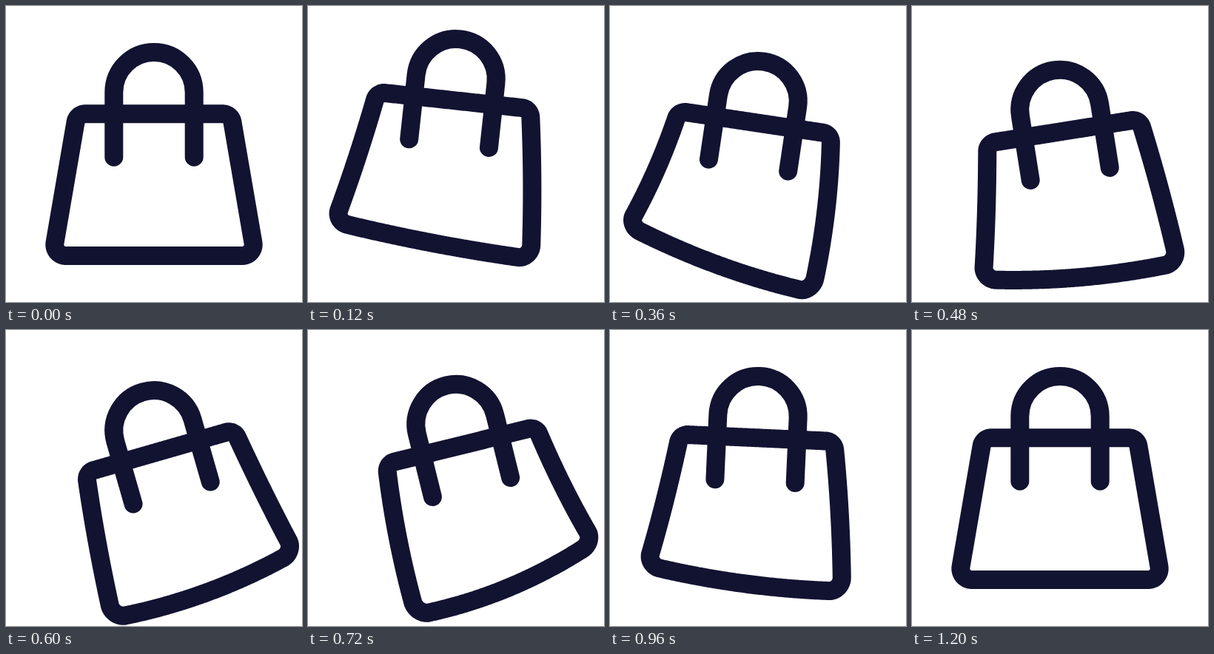
An HTML page that plays this animation: 400 px wide and 400 px high, repeating every 3.23 s.

```html
<!DOCTYPE html>
<html lang="en">
<head>
<meta charset="utf-8">
<title>Swinging bag</title>
<style>
  html, body { margin: 0; width: 100%; height: 100%; overflow: hidden; background: #fff; }
  svg { display: block; width: 100vw; height: 100vh; }
  path { fill: none; stroke: #121331; stroke-width: 25; stroke-linecap: round; stroke-linejoin: round; }
</style>
</head>
<body>
<svg viewBox="0 0 400 400">
  <path id="body" d="M107 145.8H293A13 13 0 0 1 305.9 156.6L334 320A15 15 0 0 1 319.2 337.5H80.8A15 15 0 0 1 66 320L94.1 156.6A13 13 0 0 1 107 145.8Z"/>
  <path id="handle" d="M145.8 204.2V116.7A54.2 54.2 0 0 1 254.2 116.7V204.2"/>
</svg>
<script>
const LOOP = 3230, STEP = 30, END = 1200;
const PX = 200, PY = 116.7;        // pivot: centre of the handle arc
const TOP = 29.1, HEIGHT = 191.7;  // body, measured down from the pivot
const RAD = Math.PI / 180;

// [time, value] keys
const SWING = [[0, 0], [240, 13.8], [360, 8.5], [480, -9], [620, -16.5], [720, -13.9], [960, 2.6], [1080, 2], [END, 0]];
const BEND = [[0, 0], [240, 11.2], [360, 11.6], [480, 4], [720, -8.6], [960, 5], [1080, 5], [END, 0]];
const SAG = [[0, 0], [240, 7], [480, 7], [720, 11], [960, 6], [1080, 4.5], [END, 0]];
const LIFT = [[0, 0], [180, -24], [450, 24], [960, 0], [END, 0]];

const body = document.getElementById('body');
const handle = document.getElementById('handle');
const length = body.getTotalLength();
const outline = Array.from({ length: 400 }, (_, i) => {
  const p = body.getPointAtLength(length * i / 400);
  return [p.x - PX, p.y - PY];
});

function segment(keys, t) {
  let i = 0;
  while (i < keys.length - 2 && t > keys[i + 1][0]) i++;
  return i;
}

// Smooth curve through all keys, at rest at both ends
function spline(keys, t) {
  const slope = i => i < 1 || i > keys.length - 2 ? 0
    : (keys[i + 1][1] - keys[i - 1][1]) / (keys[i + 1][0] - keys[i - 1][0]);
  const i = segment(keys, t), [t0, v0] = keys[i], [t1, v1] = keys[i + 1];
  const d = t1 - t0, p = (t - t0) / d, q = 1 - p;
  return v0 * q * q * (1 + 2 * p) + v1 * p * p * (3 - 2 * p)
    + d * p * q * (slope(i) * q - slope(i + 1) * p);
}

// Eases in and out of every key
function ease(keys, t) {
  const i = segment(keys, t), [t0, v0] = keys[i], [t1, v1] = keys[i + 1];
  return v0 + (v1 - v0) * (1 - Math.cos(Math.PI * (t - t0) / (t1 - t0))) / 2;
}

// Bends the body along a curved spine, with a slack bottom edge
function warp([x, y], swing, bend, sag) {
  const u = Math.max(0, y - TOP), v = u / HEIGHT;
  const mid = swing + bend * v / 2, turn = swing + bend * v;
  const down = u + sag * v * v * (1 - (x / 125) ** 2);
  const side = x * (1 - 0.005 * sag * v), neck = y - u;
  return [
    PX - neck * Math.sin(swing) - down * Math.sin(mid) + side * Math.cos(turn),
    PY + neck * Math.cos(swing) + down * Math.cos(mid) + side * Math.sin(turn)
  ].map(n => n.toFixed(2));
}

function draw(now) {
  const t = Math.min(END, Math.floor(now % LOOP / STEP) * STEP);
  const swing = spline(SWING, t), bend = spline(BEND, t) * RAD;
  const sag = spline(SAG, t), lift = ease(LIFT, t);
  body.setAttribute('d', 'M' + outline.map(p => warp(p, swing * RAD, bend, sag)).join('L') + 'Z');
  body.setAttribute('transform', `translate(0 ${lift})`);
  handle.setAttribute('transform', `translate(0 ${lift}) rotate(${swing} ${PX} ${PY})`);
}

let start;
function frame(now) {
  start ??= now;
  draw(now - start);
  requestAnimationFrame(frame);
}
draw(0);
requestAnimationFrame(frame);
</script>
</body>
</html>
```
